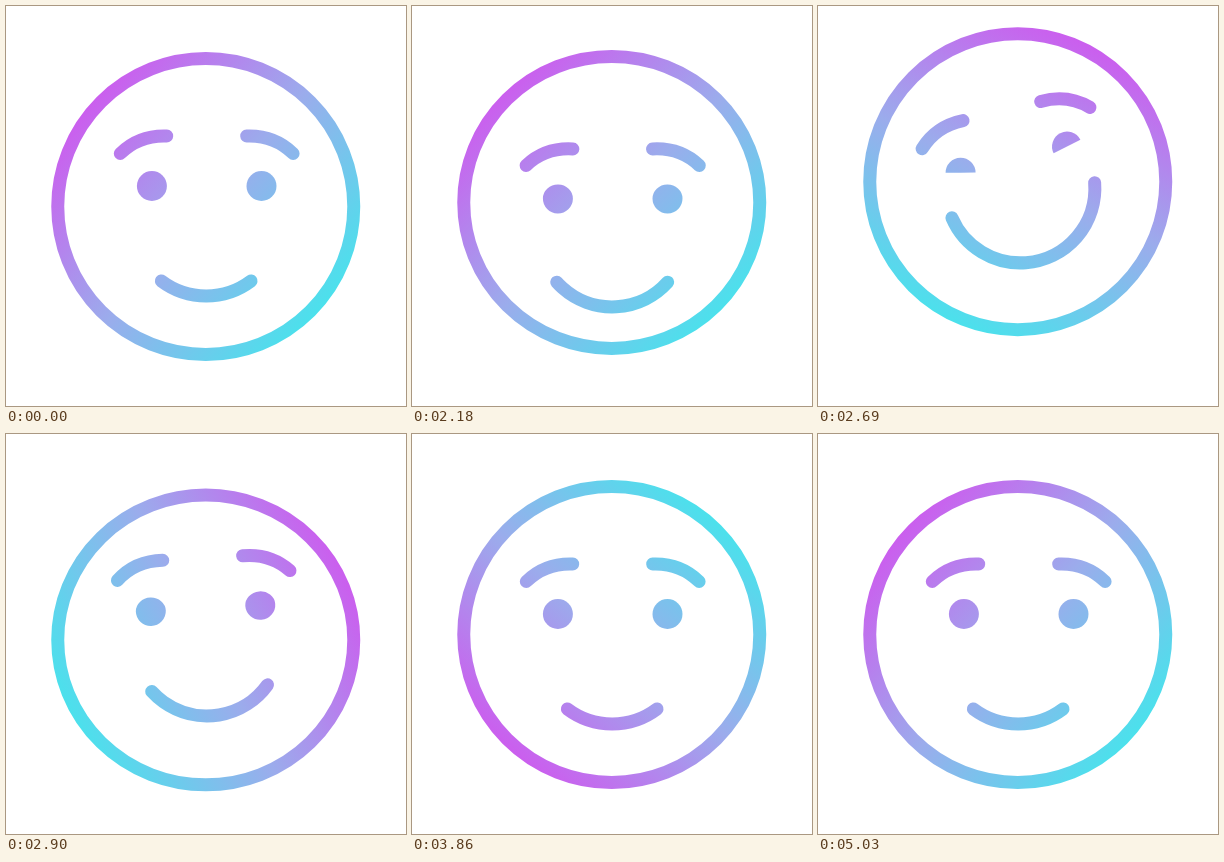
Write an HTML page with a canvas that moves like this. It is 400 by 400 pixels and loops after 5180 ms.

```html
<!DOCTYPE html>
<html lang="en">
<head>
<meta charset="utf-8">
<title>Smiling face</title>
<style>
  html, body { margin: 0; width: 100%; height: 100%; overflow: hidden; background: #fff; }
  canvas { display: block; width: 100%; height: 100%; }
</style>
</head>
<body>
<canvas width="400" height="400"></canvas>
<script>
const LOOP = 5180;
const CX = 199.75, CY = 200.5;
const g = document.querySelector('canvas').getContext('2d');
const rad = deg => deg * Math.PI / 180;

// 0 to 1 between two times, slow at both ends.
function ease(t, from, to) {
  const u = Math.min(1, Math.max(0, (t - from) / (to - from)));
  return u * u * (3 - 2 * u);
}

// 0 to 1 and back to 0.
function hump(t, from, to) {
  const mid = (from + to) / 2;
  return ease(t, from, mid) - ease(t, mid, to);
}

const crouch = t => hump(t, 2000, 2220) + hump(t, 2850, 3070);
const lift = t => ease(t, 2090, 2340) - ease(t, 2640, 2930);
const jump = t => 14 * crouch(t) - 27 * lift(t);
const rebound = t => hump(t, 3000, 3220);
const flight = t => hump(t, 2190, 2350) + hump(t, 2740, 2900);
const laugh = t => ease(t, 2090, 2365) - ease(t, 2740, 3000);
const tilt = t => ease(t, 2240, 2440) - ease(t, 2730, 2980);
// Two half turns that flow into each other.
const spin = t => 41 + 180 * (ease(t, 2030, 3530) + ease(t, 3150, 4570));

function placed(x, y, deg, paint) {
  g.save();
  g.translate(x, y);
  g.rotate(rad(deg));
  g.beginPath();
  paint();
  g.restore();
}

function drawSide(side, t) {
  placed(side * 63.2, -61.5, -side * 4 * hump(t, 2130, 2410), () => {
    g.moveTo(-side * 23.2, -9);
    g.quadraticCurveTo(side * 4.5, -10, side * 23.2, 8.5);
    g.stroke();
  });
  // A squinting eye flattens from a disc into a half disc.
  const squint = laugh(t) ** 2, bulge = 16 * squint * (1 - squint);
  placed(side * 54.8, -20.5, -side * 13.2 * squint, () => {
    g.ellipse(0, 0, 15, 15 - bulge, 0, Math.PI, 2 * Math.PI);
    g.ellipse(0, 0, 15, Math.max(0, 15 * (1 - squint) + bulge), 0, 0, Math.PI);
    g.fill();
  });
}

function drawMouth(t) {
  const half = rad(37 + 43.5 * laugh(t));
  g.beginPath();
  g.arc(-0.5, 15 - 6 * laugh(t), 74.5, Math.PI / 2 - half, Math.PI / 2 + half);
  g.stroke();
}

// Colours everything drawn so far with the turning gradient.
function tint(y, deg) {
  const dx = 155 * Math.cos(rad(deg)), dy = 155 * Math.sin(rad(deg));
  const paint = g.createLinearGradient(CX - dx, y - dy, CX + dx, y + dy);
  ['#cb5eee', '#9bacec', '#4be1ec'].forEach((c, i) => paint.addColorStop(i / 2, c));
  g.globalCompositeOperation = 'source-in';
  g.fillStyle = paint;
  g.fillRect(0, 0, 400, 400);
  g.globalCompositeOperation = 'source-over';
}

function draw(t) {
  const y = CY + jump(t) - rebound(t);
  g.clearRect(0, 0, 400, 400);
  g.fillStyle = g.strokeStyle = '#000';
  g.lineWidth = 13;
  g.lineCap = 'round';
  g.beginPath();
  g.ellipse(CX, y, 148, 148 - 7 * crouch(t) + 2.5 * flight(t), 0, 0, 2 * Math.PI);
  g.stroke();

  // The features follow the head a little late.
  placed(200.7, CY + jump(t - 60) - 4 * rebound(t), -13.8 * tilt(t), () => {
    drawSide(-1, t);
    drawSide(1, t);
    drawMouth(t);
  });
  tint(y, spin(t));
}

function frame() {
  draw(performance.now() % LOOP);
  requestAnimationFrame(frame);
}
frame();
</script>
</body>
</html>
```
